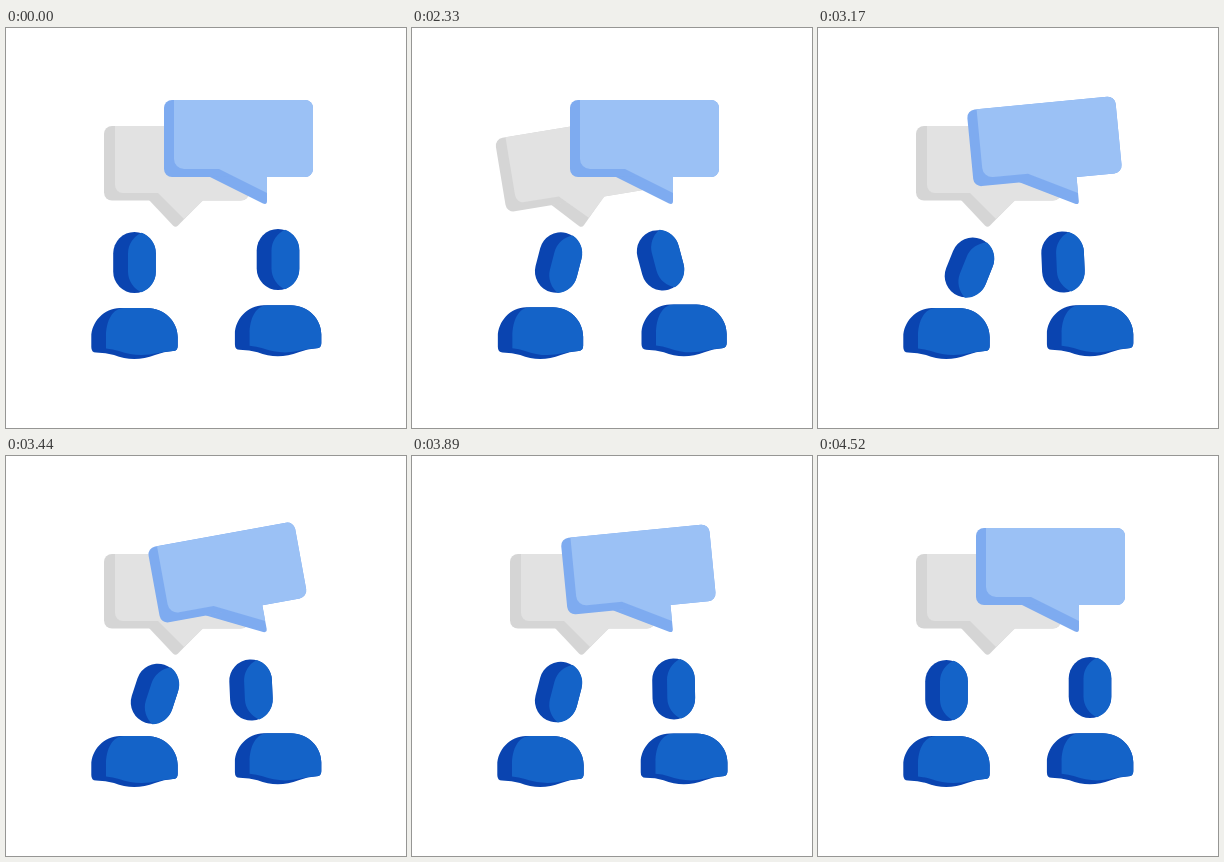
An HTML page that plays this animation: 400 px wide and 400 px high, repeating every 4550 ms.

```html
<!DOCTYPE html>
<html lang="en">
<head>
<meta charset="utf-8">
<title>Conversation</title>
<style>
  html, body { margin: 0; width: 100%; height: 100%; overflow: hidden; background: #fff; }
  svg { display: block; width: 100vw; height: 100vh; }
  .dark { fill: #0a44b0; }
  .main { fill: #1463c8; }
</style>
</head>
<body>
<svg viewBox="0 0 400 400">
  <defs>
    <g id="head">
      <rect class="dark" x="-21.3" y="-30.5" width="42.6" height="61" rx="21.3"/>
      <path class="main" d="M7 -29.8A21.3 21.3 0 0 1 21.3 -9.2V9.2A21.3 21.3 0 0 1 7 29.8A23 23 0 0 1 -6.5 9.2V-9.2A23 23 0 0 1 7 -29.8Z"/>
    </g>
    <g id="body" transform="translate(-128.5 -331)">
      <path class="dark" d="M85.300 309C85.300 294 98 280 114 280H141C159 280 171.700 294 171.700 309V318Q171.700 323 167 323Q158 323.500 149 327Q128 335 108 327Q100 324.500 90 324.500Q85.300 324.500 85.300 319Z"/>
      <path class="main" d="M100 309C100 292 107 280 118 280H141C159 280 171.700 294 171.700 309V318Q171.700 323 167 323Q159 323.500 152 325Q132 330 113 323Q107 321 100 320.500Z"/>
    </g>
  </defs>
  <g id="grayBubble">
    <g fill="#d5d5d5">
      <rect x="98" y="98" width="145" height="74.500" rx="8"/>
      <path d="M143 172L167 197.500Q169.500 200 172 197.500L197 172Z"/>
    </g>
    <path fill="#e2e2e2" d="M109 98H235a8 8 0 0 1 8 8V164.500a8 8 0 0 1 -8 8H197L178 191L152 165H117a8 8 0 0 1 -8 -8Z"/>
  </g>
  <g id="blueBubble">
    <g fill="#7eabf0">
      <rect x="158" y="72" width="149" height="77" rx="8"/>
      <path d="M203 148.500L257 175.500Q261 177 261 173V148Z"/>
    </g>
    <path fill="#9bc1f5" d="M168 72H299a8 8 0 0 1 8 8V141a8 8 0 0 1 -8 8H261V165L213 141H178a10 10 0 0 1 -10 -10Z"/>
  </g>
  <use id="leftHead" href="#head"/>
  <use id="leftBody" href="#body"/>
  <use id="rightHead" href="#head"/>
  <use id="rightBody" href="#body"/>
</svg>
<script>
const LOOP = 4550, START = 2030, STEP = 30;
const SWING_BEAT = 225, WOBBLE = 420;

const progress = (t, start, length) => Math.min(1, Math.max(0, (t - start) / length));
const smooth = p => p * p * (3 - 2 * p);
const ramp = (t, start, length) => smooth(progress(t, start, length));
const easeOut = (t, start, length) => 1 - (1 - progress(t, start, length)) ** 3;
const bump = (t, start, length) => Math.sin(Math.PI * progress(t, start, length)) ** 2;

// Five beats: every peak is on the other side and 6 degrees smaller
function swing(t, start) {
  const beats = 5 * progress(t, start, 5 * SWING_BEAT);
  const peak = i => i < 5 ? (-1) ** i * (27.5 - 6 * i) : 0;
  if (beats < 1) return peak(1) * Math.sin(beats * Math.PI / 2);
  const i = Math.floor(beats);
  return peak(i) + (peak(i + 1) - peak(i)) * smooth(beats - i);
}

// Squash followed by a weaker stretch
function wobble(t, start) {
  const p = progress(t, start, WOBBLE);
  return Math.sin(2 * Math.PI * p) * (1 - p);
}

const setTransform = (id, value) => document.getElementById(id).setAttribute("transform", value);

function drawPerson(side, head, squash, bodyX, bodyY) {
  setTransform(side + "Head", `translate(${head.x} ${head.y + squash * 6}) rotate(${head.angle})`);
  setTransform(side + "Body", `translate(${bodyX} ${bodyY}) scale(${1 + squash * 0.05} ${1 - squash * 0.06})`);
}

function leftHead(t) {
  const lean = ramp(t, 1985, 325) - ramp(t, 4075, 355);
  const nod = bump(t, 2760, 900);
  return { x: 128.5 + 18 * lean + 5 * nod, y: 234.5 + 1.5 * lean + 3.5 * nod, angle: 14.5 * lean + 7.5 * nod };
}

function rightHead(t) {
  const lean = ramp(t, 2030, 300), settle = ramp(t, 2560, 460);
  const away = 1 - easeOut(t, 3690, 730);
  return {
    x: 272 - (23.5 * lean + 3.5 * settle) * away,
    y: 231.5 + 2.5 * lean * away,
    angle: (12.5 * settle - 15 * lean) * away
  };
}

function draw(now) {
  const time = now % LOOP;
  const t = time < START ? 0 : START + Math.floor((time - START) / STEP) * STEP;
  setTransform("grayBubble", `rotate(${swing(t, 2019)} 170 198)`);
  setTransform("blueBubble", `rotate(${swing(t, 3133)} 260 175)`);
  drawPerson("left", leftHead(t), wobble(t, 2015) + wobble(t, 4085), 128.5, 331);
  drawPerson("right", rightHead(t), wobble(t, 2030) + wobble(t, 3690), 272.1, 328.3);
  requestAnimationFrame(draw);
}
draw(performance.now());
</script>
</body>
</html>
```
